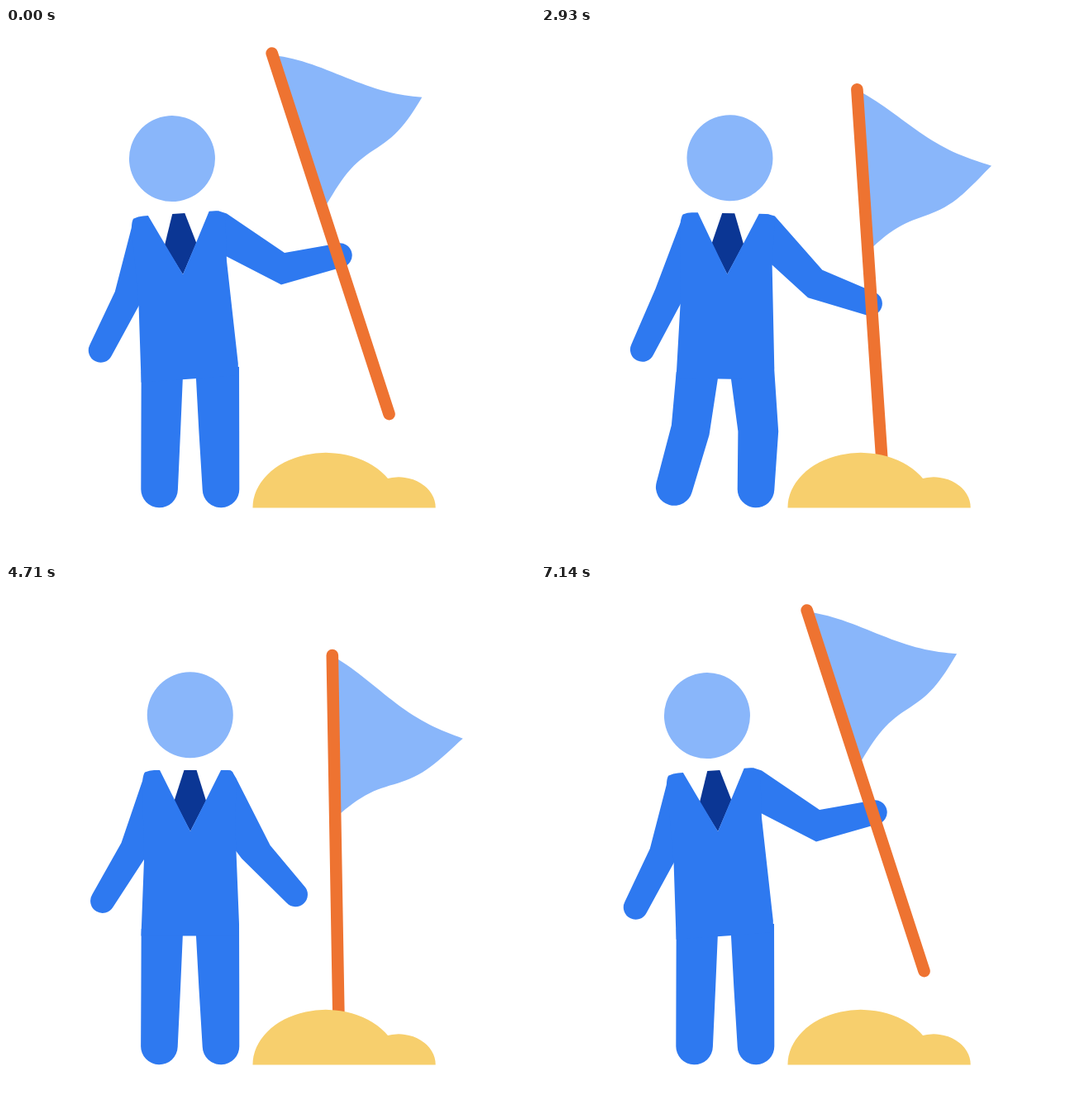
These frames come from a looping animation (640x640 px, 7.21 s). An HTML page:

```html
<!DOCTYPE html>
<html lang="en">
<head>
<meta charset="utf-8">
<title>Planting a flag</title>
<style>
  html, body { margin: 0; width: 100%; height: 100%; overflow: hidden; background: #fff; }
  svg { display: block; width: 100%; height: 100%; }
  .suit { fill: #2e79f0; }
  .light { fill: #89b6fa; }
  .tie { fill: #0b3694; }
  .sand { fill: #f7cf6d; }
  .pole { stroke: #ee7331; stroke-width: 14.6; stroke-linecap: round; }
</style>
</head>
<body>
<svg viewBox="0 0 640 640">
  <path class="suit" id="leftLeg"/>
  <path class="suit" id="rightLeg"/>
  <path class="suit" id="leftArm"/>
  <path class="suit" id="rightArm"/>
  <g id="torso">
    <path class="tie" d="M215.4 224H230.5L242 261L223 298L203.5 261Z"/>
    <path class="suit" d="M165 237Q166 229 168 226.5Q174 223.8 180 224H186L223 298L260 224H268Q274 224 275 228L279 235L277 285L282 410L281 424.5H163.5L167 332Z"/>
  </g>
  <circle class="light" id="head" cx="222.7" cy="157.2" r="52"/>
  <g id="banner">
    <path class="light" id="flag"/>
    <path class="pole" d="M394.8 85L402.8 544"/>
  </g>
  <path class="sand" d="M298.5 580.4A88.5 66.4 0 0 1 462 545A44.6 36.9 0 0 1 519.7 580.4Z"/>
</svg>
<script>
const LOOP = 7210, STEP = 71.4, CYCLE = 50, WAVE = 8.36;
const HIP = [222.5, 425];
const GRIP = [399.3, 343];
const el = id => document.getElementById(id);

// Armpits are heights on the sides of the upright torso
const rest = {
  body: { tilt: 0, stride: 0 },
  left: { elbow: [139.5, 312], armpit: 332, hand: [117, 382.3] },
  right: { shoulder: [279, 235], elbow: [319.5, 315], inner: [285, 331], armpit: 321, hand: [350, 374.7] }
};
const grip = {
  body: { tilt: 2.1, stride: 1.5 },
  left: { elbow: [138.7, 300], armpit: 318, hand: [88, 356] },
  right: { shoulder: [286, 228], elbow: [341, 297], inner: [321, 329.5], armpit: 287, hand: [397, 345] }
};
const raised = {
  body: { tilt: -4.05, stride: 0 },
  left: { elbow: [131.8, 319], armpit: 332, hand: [114.5, 390] },
  right: { shoulder: [267, 224.5], elbow: [337, 272], inner: [333, 310.5], armpit: 280, hand: [404, 275] }
};

// Blends numbers, points and whole poses
function mix(a, b, k) {
  if (typeof a === 'number') return a + (b - a) * k;
  if (Array.isArray(a)) return a.map((v, i) => mix(v, b[i], k));
  return Object.fromEntries(Object.keys(a).map(key => [key, mix(a[key], b[key], k)]));
}

function ease(t, from, to) {
  const s = Math.min(1, Math.max(0, (t - from) / (to - from)));
  return s * s * (3 - 2 * s);
}

function turn([x, y], degrees) {
  const a = degrees * Math.PI / 180, dx = x - HIP[0], dy = y - HIP[1];
  return [HIP[0] + dx * Math.cos(a) - dy * Math.sin(a), HIP[1] + dx * Math.sin(a) + dy * Math.cos(a)];
}

// A limb runs along before, joint a, a round end of radius r, joint b and after
function limb(before, a, end, r, b, after) {
  const dx = end[0] - (a[0] + b[0]) / 2, dy = end[1] - (a[1] + b[1]) / 2;
  const len = Math.hypot(dx, dy);
  const side = Math.sign((b[0] - a[0]) * dy + (a[1] - b[1]) * dx) || 1;
  const px = -dy / len * r * side, py = dx / len * r * side;
  const p = [end[0] + px, end[1] + py], q = [end[0] - px, end[1] - py];
  return `M${[...before, a, p].join('L')}A${r} ${r} 0 0 ${side > 0 ? 0 : 1} ${q}L${[b, ...after].join('L')}Z`;
}

function drawMan(t, lift) {
  const release = 1 - ease(t, 7.6, 16.4), reach = ease(t, 30, 40);
  const swing = release - .25 * reach;
  const pose = (part, k) => mix(mix(rest[part], grip[part], k), raised[part], lift);
  const { tilt, stride } = pose('body', release + reach);
  const left = pose('left', swing), right = pose('right', release + reach);
  const torso = (x, y) => turn([x, y], tilt);

  el('torso').setAttribute('transform', `rotate(${tilt} ${HIP})`);
  el('head').setAttribute('transform', `rotate(${tilt * 1.15} ${HIP})`);
  el('leftArm').setAttribute('d', limb([torso(180, 245), torso(165, 237)],
    left.elbow, left.hand, 14.7, torso(167, left.armpit), [torso(185, 300)]));
  el('rightArm').setAttribute('d', limb([torso(255, 270), torso(264, 224.5), torso(272, 224.5), right.shoulder],
    right.elbow, right.hand, 14.7, right.inner, [torso(277.4, right.armpit)]));
  el('leftLeg').setAttribute('d', limb([[215, 405], [163.7, 416]], [163.5 - 4.5 * stride, 488 - 6 * stride],
    [185.6 - 19.5 * stride, 558 - 2 * stride], 22.3, [211 - 6 * stride, 490 + 2 * stride], [[213.8, 425]]));
  el('rightLeg').setAttribute('d', limb([[229, 405], [230, 425]], [233.4 + 4 * stride, 488],
    [260, 558], 22.3, [282.2 + 4 * stride, 488], [[282, 410]]));
}

// Ripples travel from the pole (s = 0) to the tip (s = 1) along both edges
function flagPath(u) {
  const ripple = phase => Math.cos(2 * Math.PI * (u - phase));
  const tipX = 551.6 + 1.3 * ripple(0);
  const upper = s => [mix(402, tipX, s), mix(98, 185.5, s) + mix(8, 6.8, s) * ripple(.43 + .73 * s)];
  const lower = s => [mix(405.4, tipX, s),
    mix(281.5, 185.5, s) + (mix(7, 6.8, s) + 3 * Math.sin(Math.PI * s)) * ripple(.32 + .84 * s)];
  const steps = Array.from({ length: 31 }, (_, i) => i / 30);
  const edge = [...steps.map(upper), ...steps.map(s => lower(1 - s))];
  return `M396 ${upper(0)[1]}L${edge.join('L')}L398 ${lower(0)[1]}Z`;
}

function drawBanner(t, lift) {
  el('banner').setAttribute('transform',
    `translate(${2.1 * lift} ${-67.1 * lift}) rotate(${-17 * lift} ${GRIP})`);
  el('flag').setAttribute('d', flagPath(t / WAVE));
}

function draw(now) {
  const step = Math.floor((now % LOOP + 3) / STEP);
  const t = step >= 2 * CYCLE ? CYCLE : step % CYCLE;
  const lift = 1 - ease(t, 0, 8.6) + ease(t, 38.9, 47);
  drawMan(t, lift);
  drawBanner(t, lift);
}

const start = performance.now();
function tick() {
  draw(performance.now() - start);
  requestAnimationFrame(tick);
}
tick();
</script>
</body>
</html>
```
